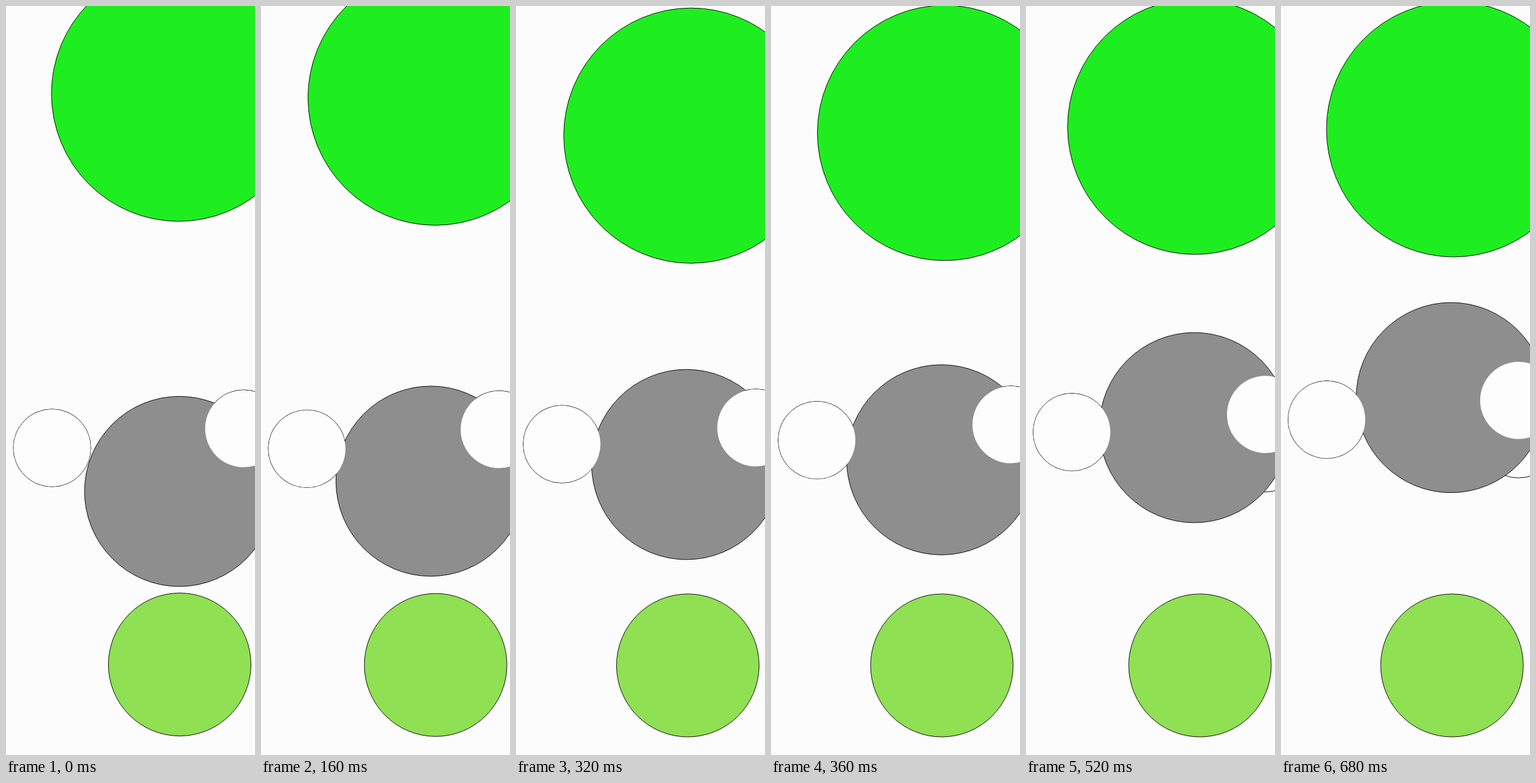
Write an HTML page that moves like this. It is 400 by 1200 pixels and loops after 720 ms.

```html
<!DOCTYPE html>
<html lang="en">
<head>
<meta charset="utf-8">
<title>Drifting circles</title>
<style>
  html, body { margin: 0; width: 100%; height: 100%; overflow: hidden; background: #fcfcfc; }
  svg { display: block; width: 100vw; height: 100vh; }
  .outlined { stroke: #101010; stroke-width: 1; }
</style>
</head>
<body>
<svg id="stage" viewBox="0 0 400 1200"></svg>
<script>
const STEP = 40, STEPS = 18;
const WHITE = '#fdfdfd';
const POSES = [0, 3, 6, 8, 11, 13, 17]; // steps at which the key positions hold

// Sine with a period of `period` steps, rising through zero at `from`.
const swing = (s, from, period) => Math.sin(2 * Math.PI * (s - from) / period);

// Single arch from 0 to 1 and back, flat outside its span.
const hump = (s, from, to) =>
  s < from || s > to ? 0 : Math.sin(Math.PI * (s - from) / (to - from));

const easeOut = k => k * (2 - k);

// Smooth curve through one value per pose that never overshoots.
function curve(...values) {
  const slopes = POSES.slice(1).map((p, i) => (values[i + 1] - values[i]) / (p - POSES[i]));
  const tangents = values.map((_, i) => {
    const before = slopes[i - 1] ?? slopes[i];
    const after = slopes[i] ?? before;
    return before * after > 0 ? 2 * before * after / (before + after) : 0;
  });
  return s => {
    const i = Math.max(0, POSES.findLastIndex((p, n) => p <= s && n < POSES.length - 1));
    const span = POSES[i + 1] - POSES[i];
    const k = (s - POSES[i]) / span;
    const ease = k * k * (3 - 2 * k);
    return values[i] + (values[i + 1] - values[i]) * ease
      + span * k * (1 - k) * (tangents[i] * (1 - k) - tangents[i + 1] * k);
  };
}

const greenY = curve(140.5, 141.5, 172, 207.7, 191, 193.5, 197.5);
const brownY = curve(777.7, 769, 742.2, 734.6, 704.8, 675.5, 627.4);
const limeX = curve(279, 279, 285, 276, 273, 279.5, 274.7);
const leftY = curve(708, 707, 716, 702, 685.7, 682.7, 662.7);

const green = s => [277 + 5.8 * swing(Math.max(s, 3), 2.8, 14), greenY(s)];
const brown = s => [
  s < 6 ? 278.5 - 6.5 * easeOut(s / 6) : 272 + 1.9 * swing(s, 6, 10),
  brownY(s)
];
const lime = s => [limeX(s), 1055 + 1.5 * Math.min(s / 8, 1)];
const left = s => [74 - 0.03 * s, leftY(s)];
const right = s => [381.7 + 3.8 * hump(s, 3, 17), leftY(s) - 30.8 + 6.5 * hump(s, 6, 14)];
const lower = s => [right(s)[0], right(s)[1] + 62];

// Back to front; white discs are repeated over the brown one without an outline.
const discs = [
  { place: green, r: 204.5, fill: '#1eee1f', outlined: true },
  { place: lime, r: 114.5, fill: '#8fe052', outlined: true },
  { place: lower, r: 62.2, fill: WHITE, outlined: true },
  { place: left, r: 62.2, fill: WHITE, outlined: true },
  { place: right, r: 62.2, fill: WHITE, outlined: true },
  { place: brown, r: 152.3, fill: '#8e8e8e', outlined: true },
  { place: left, r: 61.8, fill: WHITE },
  { place: right, r: 61.8, fill: WHITE }
];

const stage = document.getElementById('stage');
for (const disc of discs) {
  const el = document.createElementNS(stage.namespaceURI, 'circle');
  el.setAttribute('r', disc.r);
  el.setAttribute('fill', disc.fill);
  if (disc.outlined) el.setAttribute('class', 'outlined');
  disc.el = stage.appendChild(el);
}

function draw(time) {
  const step = Math.floor(time / STEP) % STEPS;
  for (const { el, place } of discs) {
    const [x, y] = place(step);
    el.setAttribute('cx', x);
    el.setAttribute('cy', y);
  }
}

const start = performance.now();
function tick() {
  draw(performance.now() - start);
  requestAnimationFrame(tick);
}
tick();
</script>
</body>
</html>
```
